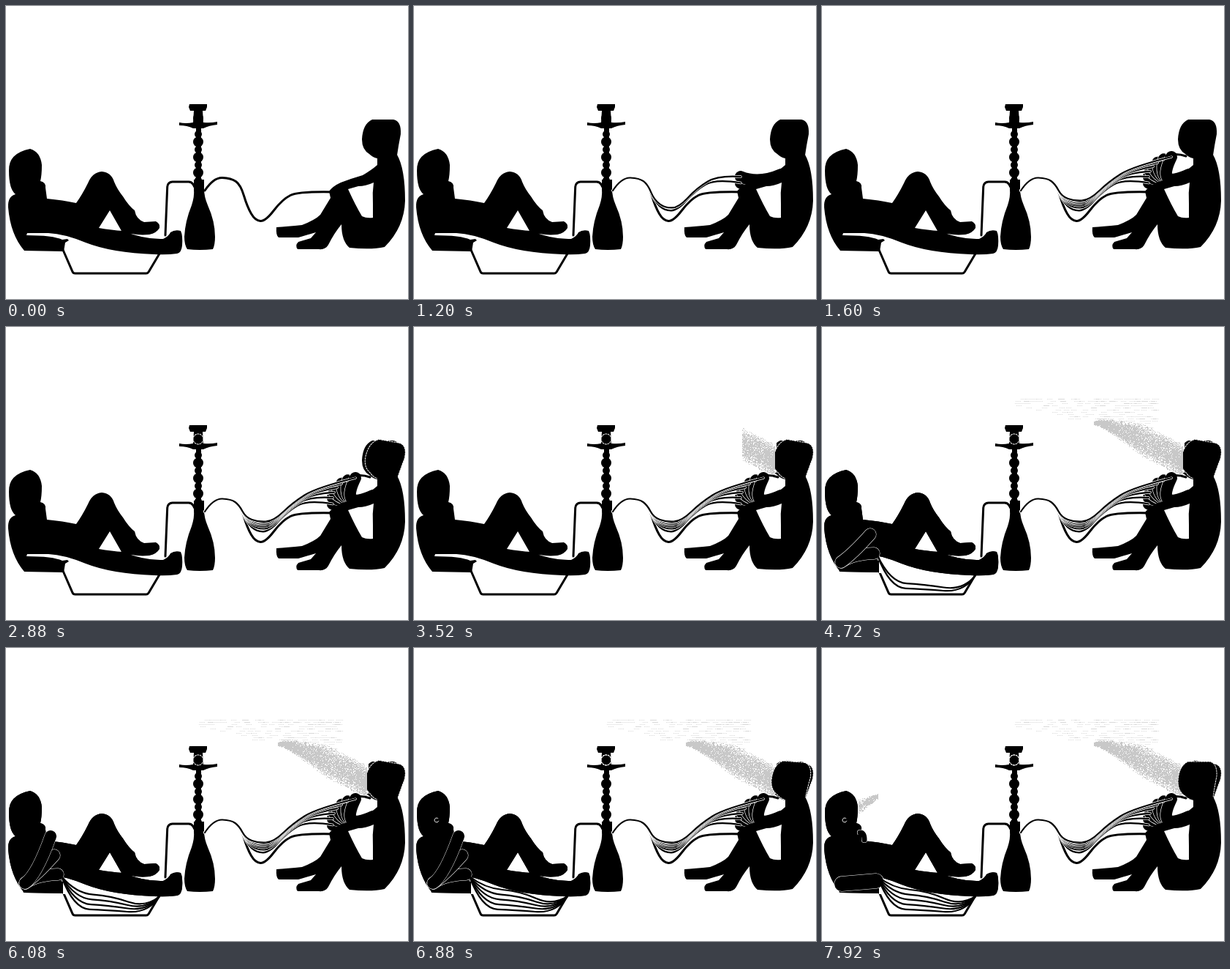
Write an HTML page with a canvas that moves like this. It is 550 by 400 pixels and loops after 8 s.

```html
<!DOCTYPE html>
<html lang="en">
<head>
<meta charset="utf-8">
<title>Hookah silhouettes</title>
<style>
html, body { margin: 0; width: 100%; height: 100%; overflow: hidden; background: #fff; }
canvas { display: block; }
</style>
</head>
<body>
<canvas id="stage" width="550" height="400"></canvas>
<script>
const ctx = document.getElementById('stage').getContext('2d');
const LOOP = 8000, STEP = 80;
const INK = '#000', PAPER = '#fff', SMOKE = '#c8c8c8', HAZE = '#d8d8d8';

const pipe = new Path2D(
  'M251 134H275V138L273 143H269L270 159Q280 160 289 158V162Q278 163 270 167H256Q248 163 237 163V159Q246 161 256 159' +
  'L257 143H252L250 138Z' +
  'M260 166H267V240H260ZM257 237H271V250Q271 260 276 272Q286 294 286 315Q286 326 283 332' +
  'Q265 334 248 332Q244 326 244 315Q245 294 254 272Q258 260 257 250Z');

const lounger = new Path2D(
  'M33 195Q47 199 49 217Q49 231 47 239Q55 241 54 248L56 263Q78 265 96 269Q104 258 112 242Q118 227 131 226' +
  'Q144 227 148 240Q152 250 160 260Q168 273 176 279Q178 291 189 295L205 294Q211 297 210 303Q206 310 196 312' +
  'Q175 314 158 307L142 279L127 303Q145 306 160 307Q190 319 215 318Q223 314 225 309Q231 305 239 307' +
  'Q242 313 241 327Q240 337 234 338Q220 340 203 339Q145 337 109 323Q80 311 58 310L29 310L28 313' +
  'Q64 313 77 319L84 318L86 320L81 323L79 335L25 334Q6 312 3 275Q2 260 13 257Q4 250 4 225Q3 201 33 195Z');
const forearm = new Path2D('M16 306L75 310L78 334H24Z');

// The last loop is the gap between thigh and chest
const sitter = new Path2D(
  'M508 203H535Q546 222 546 266Q545 302 518 329Q500 333 470 330Q459 321 459 298Q449 310 441 326Q437 333 428 332' +
  'H399Q395 327 400 322L417 317L424 309Q410 313 400 316H373Q369 313 370 302Q385 301 405 299' +
  'Q423 292 430 285L444 262L442 253Q447 246 458 241Q474 235 488 231Q500 224 508 217Z' +
  'M468 250L482 246Q492 246 503 241Q501 255 502 270V289Q493 290 487 287Q478 272 468 250Z');
const head = new Path2D('M501 155H530Q541 157 540 175Q537 190 535 204L508 208Q502 207 497 202Q487 196 487 182Q488 161 501 155Z');

const hoseLow = [[272, 252], [284, 234], [308, 235], [321, 244], [330, 274], [341, 293], [355, 294], [378, 264], [400, 253], [449, 254]];
const hoseHigh = [[272, 252], [284, 234], [308, 235], [319, 243], [328, 260], [345, 266], [366, 265], [392, 240], [425, 219], [478, 205]];
const tubeLow = [[76, 312], [91, 363], [135, 364], [196, 365], [210, 339]];
const tubeHigh = [[76, 312], [97, 328], [145, 332], [190, 352], [210, 339]];

const clamp = (v, hi) => Math.max(0, Math.min(hi, v));
const lerp = (a, b, p) => a + (b - a) * p;
const mix = (a, b, p) => a.map(([x, y], i) => [lerp(x, b[i][0], p), lerp(y, b[i][1], p)]);
const bezier = (a, b, c, p) => lerp(lerp(a, b, p), lerp(b, c, p), p);

let seed = 41;
function rnd() {
  seed = (seed * 1664525 + 1013904223) % 4294967296;
  return seed / 4294967296;
}
const fill = (n, make) => Array.from({ length: n }, make);

const plume = fill(7500, () => {
  const x = 494 - 122 * rnd() ** 1.25;
  const mid = 131 + 51 * clamp((x - 380) / 112, 1) ** 1.2;
  const half = 23 * clamp((x - 366) / 70, 1);
  return [Math.floor(x), Math.round(mid + half * (rnd() * 1.3 + rnd() * 0.7 - 1))];
});
const drift = fill(200, () => {
  const x = Math.floor(240 + 215 * Math.sqrt(rnd()));
  const y = 98 + 3 * Math.floor(rnd() ** 1.3 * (6 + (x - 240) * 0.22) / 3);
  return fill(4, (_, i) => [x + 2 * i, y]);
}).flat();
const puff = fill(600, () => {
  const u = rnd();
  return [Math.floor(50 + 27 * u), Math.round(217 - 15 * u + (rnd() + rnd() - 1) * (11 - 7 * u))];
});

function stroke(width, color) {
  ctx.lineWidth = width;
  ctx.strokeStyle = color;
  ctx.stroke();
}

// Smooth line through the middles of its points, with an optional pale rim
function curve(pts, width, rim = 0) {
  const last = pts.length - 1;
  ctx.beginPath();
  ctx.moveTo(...pts[0]);
  for (let i = 1; i < last; i++) {
    const [x, y] = pts[i], [nx, ny] = pts[i + 1];
    if (i === last - 1) ctx.quadraticCurveTo(x, y, nx, ny);
    else ctx.quadraticCurveTo(x, y, (x + nx) / 2, (y + ny) / 2);
  }
  if (rim) stroke(width + 2 * rim, PAPER);
  stroke(width, INK);
}

function bent(pts, r) {
  ctx.beginPath();
  ctx.moveTo(...pts[0]);
  for (let i = 1; i < pts.length - 1; i++) ctx.arcTo(...pts[i], ...pts[i + 1], r);
  ctx.lineTo(...pts[pts.length - 1]);
  stroke(3, INK);
}

function dots(list, color, test) {
  ctx.fillStyle = color;
  for (const [x, y] of list) if (test(x)) ctx.fillRect(x, y, 1, 1);
  ctx.fillStyle = INK;
}

function tiltedHead(deg) {
  ctx.save();
  ctx.translate(515, 207);
  ctx.rotate(deg * Math.PI / 180);
  ctx.translate(-515, -207);
  ctx.fill(head);
  ctx.setLineDash([2, 1.5]);
  stroke(1, PAPER);
  ctx.stroke(head);
  ctx.restore();
}

function hookah() {
  curve(hoseLow, 3);
  bent([[259, 249], [254, 240], [221, 240], [218, 313]], 7);
  bent([[78, 333], [92, 365], [194, 365], [210, 338]], 4);
  ctx.fill(pipe);
  for (let i = 0; i < 7; i++) {
    ctx.beginPath();
    ctx.arc(263, 175 + 10.5 * i, i % 2 ? 7 : 5, 0, 7);
    ctx.fill();
  }
  ctx.beginPath();
  ctx.arc(263, 153, 7, 0, 7);
  ctx.fill();
}

// Every pose of arm and hose stays visible behind the next one
function rightArm(count) {
  const hand = p => [bezier(449, 438, 478, p), bezier(251, 216, 206, p)];
  for (let k = 1; k <= count; k++) {
    const p = k / 7;
    curve([[502, 230], [lerp(478, 456, p), lerp(240, 251, p)], hand(p)], 16, 0.7);
  }
  ctx.fill(sitter, 'evenodd');
  for (let k = 1; k <= count; k++) {
    const p = k / 7, pts = mix(hoseLow, hoseHigh, p ** 0.35);
    pts[pts.length - 1] = hand(p);
    curve(pts, 2.2, 0.7);
  }
  if (count > 5) curve([[470, 205], [484, 200], [498, 205]], 3);
}

function leftArm(poses, tubes, lowered) {
  if (!poses) return;
  ctx.fillStyle = PAPER;
  ctx.fillRect(78, 317, 9, 19);
  ctx.fillStyle = INK;
  ctx.fill(lounger);
  ctx.fillStyle = PAPER;
  ctx.fill(new Path2D('M78 316L89 319V327L80 336H78Z'));
  ctx.fillStyle = INK;
  ctx.fill(forearm);
  if (lowered) {
    curve([[27, 322], [50, 320], [74, 318]], 20, 0.6);
    curve([[52, 252], [58, 252], [58, 262]], 7, 0.6);
    ctx.fillRect(40, 255, 14, 14);
  } else {
    for (let k = 1; k <= poses; k++) curve([[26, 321], [42, 310], [76 - 5 * k, 335 - 26 * k]], 16, 0.5);
  }
  for (let k = 1; k <= tubes; k++) curve(mix(tubeLow, tubeHigh, k / 5), 2.2);
}

function draw(n) {
  // Steps done in each part of the action
  const since = (first, count) => clamp(n - first + 1, count);
  const arm = since(14, 7);
  const lean = since(30, 11);
  const blow = since(41, 11);
  const waft = since(52, 11);
  const lift = since(73, 7);
  const back = since(83, 7);
  const exhale = Math.floor(since(90, 10) / 2);

  ctx.fillStyle = PAPER;
  ctx.fillRect(0, 0, 550, 400);
  ctx.fillStyle = INK;
  ctx.lineJoin = ctx.lineCap = 'round';

  hookah();
  ctx.fill(lounger);
  ctx.fill(head);
  if (lean > 7) {
    ctx.fillStyle = PAPER;
    ctx.fillRect(485, 153, 11, 46);
    ctx.fillStyle = INK;
  }
  if (lean) tiltedHead(10 * clamp(lean / 7, 1));

  dots(drift, HAZE, x => waft && x > 480 - 30 * waft);
  dots(plume, SMOKE, x => blow && x > 494 - 124 * blow / 11);
  if (back) tiltedHead(10 * (1 - back / 7));
  rightArm(arm);

  leftArm(Math.ceil(waft / 6) + (lift && 1), Math.ceil(waft / 6) + Math.ceil(lift * 3 / 7), n >= 93);
  if (n >= 81) {
    ctx.beginPath();
    ctx.arc(31, 235, 3, 0.4, 5.4);
    stroke(0.9, PAPER);
  }
  dots(puff, SMOKE, x => exhale && x < 58 + 9 * exhale);
}

let shown = -1;
function tick(now) {
  const n = Math.floor((now % LOOP) / STEP);
  if (n !== shown) draw(shown = n);
  requestAnimationFrame(tick);
}
draw(0);
requestAnimationFrame(tick);
</script>
</body>
</html>
```
